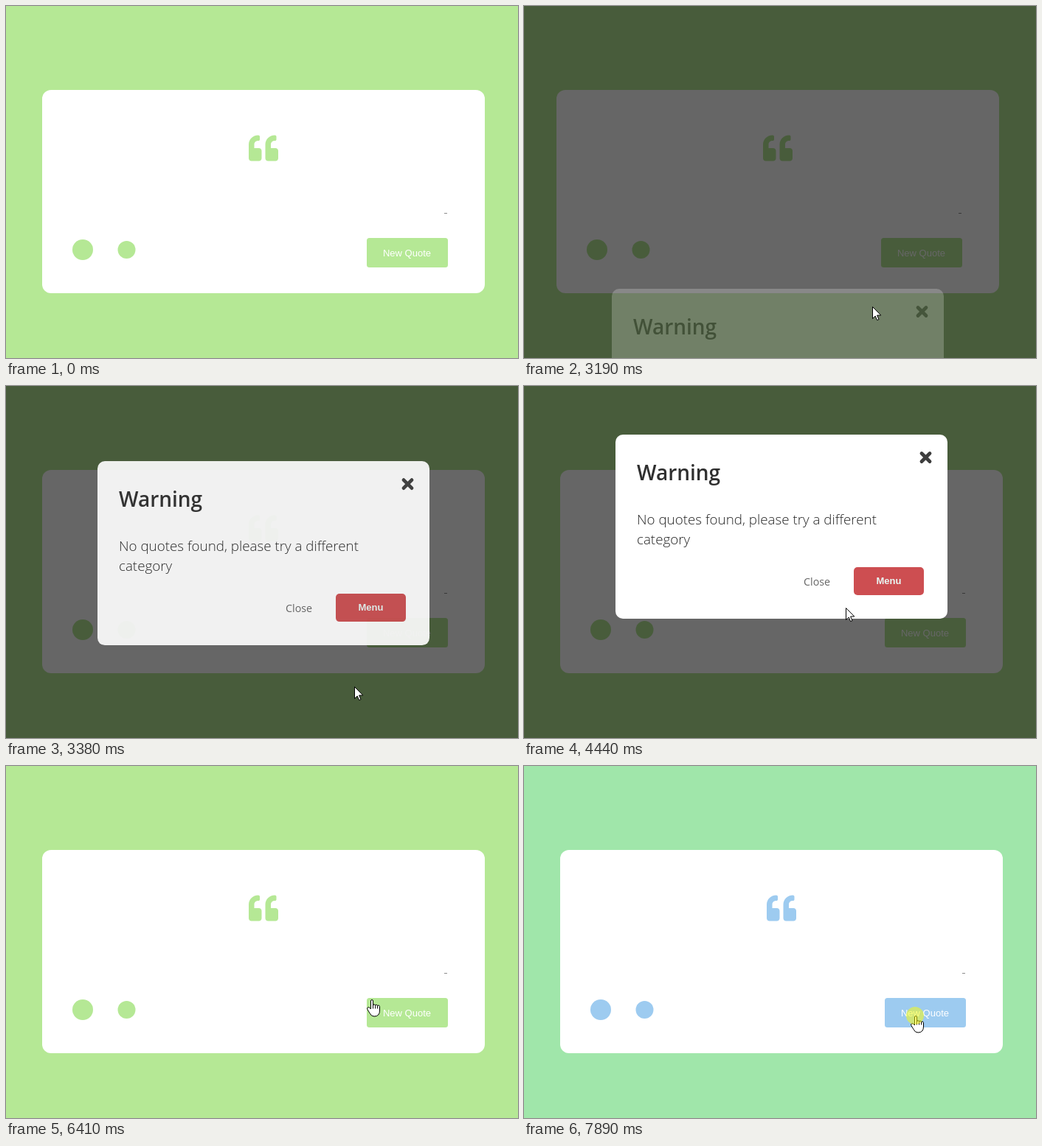
An HTML page for the animation above (8 s loop, 694 by 478 pixels).

```html
<!DOCTYPE html>
<html lang="en">
<head>
<meta charset="utf-8">
<title>Quote card</title>
<style>
  html, body { margin: 0; width: 100%; height: 100%; overflow: hidden; background: #b5e895; }
  svg { display: block; width: 694px; height: 478px; }
  .ui { font-family: "Liberation Sans", Arial, sans-serif; font-size: 13px; text-anchor: middle; }
  .copy { font-family: "Open Sans", "Noto Sans", sans-serif; }
  .body { font-size: 18.8px; font-weight: 300; fill: #262626; }
</style>
</head>
<body>
<svg viewBox="0 0 694 478">
  <defs>
    <path id="mark" d="M176 256H96v-64c0-35.3 28.7-64 64-64h8c13.3 0 24-10.7 24-24V56c0-13.3-10.7-24-24-24h-8C71.6 32 0 103.6 0 192v240c0 26.5 21.5 48 48 48h128c26.5 0 48-21.5 48-48V304c0-26.5-21.5-48-48-48z"/>
  </defs>
  <rect id="back" width="694" height="478"/>
  <g id="page">
    <rect x="49" y="114" width="600" height="276" rx="12" fill="#fff"/>
    <g id="theme">
      <g transform="translate(329 173) scale(.078125)">
        <use href="#mark"/>
        <use href="#mark" x="288"/>
      </g>
      <circle cx="104" cy="331" r="14"/>
      <circle cx="163.5" cy="331" r="12"/>
      <rect x="489" y="315" width="110" height="40" rx="3.5"/>
    </g>
    <rect x="594" y="281" width="4" height="1" fill="#8c8c8c"/>
    <text class="ui" x="543.5" y="340" fill="#fff">New Quote</text>
  </g>
  <rect id="shade" width="694" height="478" fill="#000" opacity=".6"/>
  <g id="modal">
    <rect width="450" height="250" rx="10" fill="#fff"/>
    <path d="M415 25.5l11 11m0-11l-11 11" stroke="#3e3e3e" stroke-width="4.8" stroke-linecap="round"/>
    <text class="copy" x="29" y="62" font-size="28" font-weight="600" fill="#2f2f2f">Warning</text>
    <g class="copy body">
      <text x="29" y="122">No quotes found, please try a different</text>
      <text x="29" y="149">category</text>
    </g>
    <text class="copy" x="255" y="205" font-size="14.3" fill="#666">Close</text>
    <rect x="323" y="180" width="95" height="38" rx="5" fill="#cd4e51"/>
    <text class="ui" x="370.5" y="203" font-weight="700" fill="#e8f7f3">Menu</text>
  </g>
  <g id="pointer" fill="#fff" stroke="#000" stroke-linejoin="round">
    <path id="arrow" d="M.5 .5V16.5L4.2 13 6.6 18.6 9 17.6 6.6 12H11.8Z"/>
    <g id="hand" transform="translate(-6)">
      <path d="M5.5 13V2q0-1.5 1.5-1.5T8.5 2v6q.2-1.2 1.6-1.2T11.6 8.2q.3-1 1.5-1T14.6 8.8q.3-.8 1.4-.8t1.5 1.5V15q0 8-7.5 8Q6 23 4 18.6L1 13.6q-1-2 .4-2.7T4 11.4z"/>
      <path d="M8.5 8v4.5M11.6 8.2v4.3M14.6 8.8v3.7" fill="none"/>
    </g>
  </g>
  <circle id="press" r="12" fill="#ff0" opacity=".5"/>
</svg>
<script>
const LOOP = 8000;
const $ = id => document.getElementById(id);
const [back, page, theme, shade, modal, pointer, arrow, hand, press] =
  ['back', 'page', 'theme', 'shade', 'modal', 'pointer', 'arrow', 'hand', 'press'].map($);

// [time, x, y]
const path = [
  [750, 580, 474], [1090, 472, 408], [3400, 472, 408], [3660, 501, 384],
  [3960, 501, 384], [4700, 410, 268], [5900, 410, 268], [6710, 533, 339],
  [7750, 533, 339], [7890, 530, 339]
];
// [time, r, g, b]
const backTones = [
  [6760, 181, 232, 149], [7140, 168, 232, 157], [7890, 160, 230, 170], [8000, 159, 229, 172]
];
// [time, colour]
const themeTones = [
  [0, '#b5e895'], [6760, '#78cdc3'], [6980, '#7af79f'], [7410, '#82d7be'], [7750, '#9dcbf0']
];
const presses = [
  [5240, 5390], [6690, 6760], [6790, 6980], [7190, 7410], [7570, 7750], [7890, 8000]
];

const clamp = v => Math.max(0, Math.min(1, v));
const smooth = u => u * u * (3 - 2 * u);
const show = (el, on) => el.setAttribute('visibility', on ? 'inherit' : 'hidden');
const move = (el, x, y) => el.setAttribute('transform', `translate(${x} ${y})`);

function sample(rows, t, ease = u => u) {
  if (t <= rows[0][0]) return rows[0].slice(1);
  const i = rows.findIndex(r => r[0] > t);
  if (i < 0) return rows[rows.length - 1].slice(1);
  const a = rows[i - 1], b = rows[i];
  const u = ease((t - a[0]) / (b[0] - a[0]));
  return a.slice(1).map((v, k) => v + (b[k + 1] - v) * u);
}

// cubic-bezier(.25, .1, .25, 1)
function cssEase(x) {
  const curve = (a, b, s) => 3 * a * s * (1 - s) ** 2 + 3 * b * s * s * (1 - s) + s ** 3;
  let lo = 0, hi = 1;
  for (let i = 0; i < 24; i++) {
    const mid = (lo + hi) / 2;
    if (curve(.25, .25, mid) < x) lo = mid; else hi = mid;
  }
  return curve(.1, 1, hi);
}

function render(t) {
  back.setAttribute('fill', `rgb(${sample(backTones, t).map(Math.round)})`);
  theme.setAttribute('fill', themeTones.filter(r => r[0] <= t).pop()[1]);

  const open = t >= 3190 && t < 5320;
  const p = cssEase(clamp((t - 3124) / 400));
  const top = 475 - 409 * p;
  const shift = open && top > 254 ? -5 : 0; // scrollbar while the dialog overflows
  show(shade, open);
  show(modal, open);
  modal.setAttribute('opacity', p);
  move(modal, 124 + shift, top);
  move(page, shift, 0);

  const [x, y] = sample(path, t, smooth).map(Math.round);
  const onClose = open && x < 425;
  const onButton = !open && x > 490 && x < 599 && y > 315 && y < 355;
  const pointing = onClose || onButton;
  show(pointer, t >= 770);
  show(arrow, !pointing);
  show(hand, pointing);
  move(pointer, x, y);
  move(press, x, y);
  show(press, presses.some(([a, b]) => t >= a && t < b));
}

const start = performance.now();
function tick() {
  render((performance.now() - start) % LOOP);
  requestAnimationFrame(tick);
}
tick();
</script>
</body>
</html>
```
